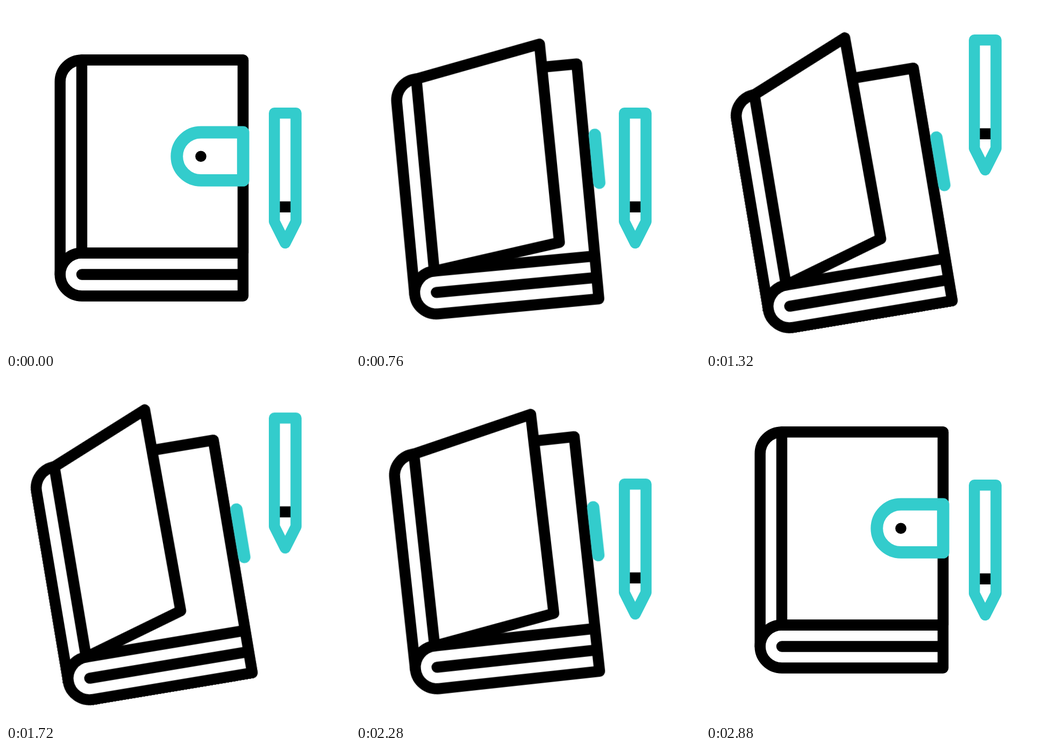
These frames come from a looping animation (640 by 640 pixels, 3000 ms). An HTML page:

```html
<!DOCTYPE html>
<html lang="en">
<head>
<meta charset="utf-8">
<title>Notebook and pencil</title>
<style>
  html, body { margin: 0; width: 100%; height: 100%; overflow: hidden; background: #fff; }
  svg { display: block; width: 100%; height: 100%; }

  .ink, .teal { fill: none; stroke-linecap: round; stroke-linejoin: round; }
  .ink { stroke: #000; stroke-width: 20.4; }
  .teal { stroke: #3cc; stroke-width: 20.6; }

  #book, #cover, #clasp, #stud, #pencil { animation: 3s linear infinite; }
  #book { transform-origin: 120px 440px; animation-name: tilt; }
  #cover { fill: #fff; animation-name: open; }
  #clasp { stroke-width: 22.8; animation-name: unclasp; }
  #stud { animation-name: slide; }
  #pencil { animation-name: lift; }

  @keyframes tilt {
    0%, 15.333% { transform: translate(0, 0) rotate(0deg); animation-timing-function: cubic-bezier(.367, 0, .133, 1); }
    45%, 57.667% { transform: translate(5.2px, 63.4px) rotate(-9.5deg); animation-timing-function: cubic-bezier(.867, 0, .633, 1); }
    87.333%, 100% { transform: translate(0, 0) rotate(0deg); }
  }

  @keyframes open {
    0%, 15.333% {
      d: path("M141 100.5 L441 100.5 L441 459.5 L141 459.5 Z");
      animation-timing-function: cubic-bezier(.367, 0, .133, 1);
    }
    45%, 57.667% {
      d: path("M141 100.5 L324.3 23.8 L328.7 403.8 L141 459.5 Z");
      animation-timing-function: cubic-bezier(.867, 0, .633, 1);
    }
    87.333%, 100% { d: path("M141 100.5 L441 100.5 L441 459.5 L141 459.5 Z"); }
  }

  @keyframes unclasp {
    0%, 7% {
      d: path("M441.2 235 L362.5 235 C337.8 235 317.8 255 317.8 279.7 C317.8 304.4 337.8 324.4 362.5 324.4 L441.2 324.4 Z");
      animation-timing-function: cubic-bezier(.33, 0, .67, 1);
    }
    14.333%, 88.333% {
      d: path("M462 235 L462 235 C462 235 462 255 462 279.7 C462 304.4 462 324.4 462 324.4 L462 324.4 Z");
      animation-timing-function: cubic-bezier(.33, 0, .67, 1);
    }
    95.667%, 100% {
      d: path("M441.2 235 L362.5 235 C337.8 235 317.8 255 317.8 279.7 C317.8 304.4 337.8 324.4 362.5 324.4 L441.2 324.4 Z");
    }
  }

  @keyframes slide {
    0%, 7% { transform: translateX(0); animation-timing-function: cubic-bezier(.33, 0, .67, 1); }
    14.333%, 88.333% { transform: translateX(99.5px); animation-timing-function: cubic-bezier(.33, 0, .67, 1); }
    95.667%, 100% { transform: translateX(0); }
  }

  @keyframes lift {
    0%, 25.333% { transform: translateY(0); animation-timing-function: ease-in-out; }
    48%, 50% { transform: translateY(-145px); animation-timing-function: ease-in-out; }
    78.333%, 100% { transform: translateY(0); }
  }
</style>
</head>
<body>
<svg viewBox="0 0 640 640">
  <g id="book">
    <g class="ink">
      <!-- back cover, pages and spine -->
      <path d="M141 100.5H441V539.5H141A40.3 40 0 0 1 141 459.5H441M141 499.5H441"/>
      <path d="M100.7 499.5V140.8A40.3 40.3 0 0 1 141 100.5"/>
      <path id="cover" d="M141 100.5 L441 100.5 L441 459.5 L141 459.5 Z"/>
    </g>
    <circle id="stud" cx="362.5" cy="279.7" r="10.3"/>
    <path id="clasp" class="teal" d="M441.2 235 L362.5 235 C337.8 235 317.8 255 317.8 279.7 C317.8 304.4 337.8 324.4 362.5 324.4 L441.2 324.4 Z"/>
  </g>
  <g id="pencil">
    <path d="M505 363.5H534V384H505Z"/>
    <path class="teal" d="M499.3 199.3H539.6V401L519.4 441L499.3 401Z"/>
  </g>
</svg>
</body>
</html>
```
